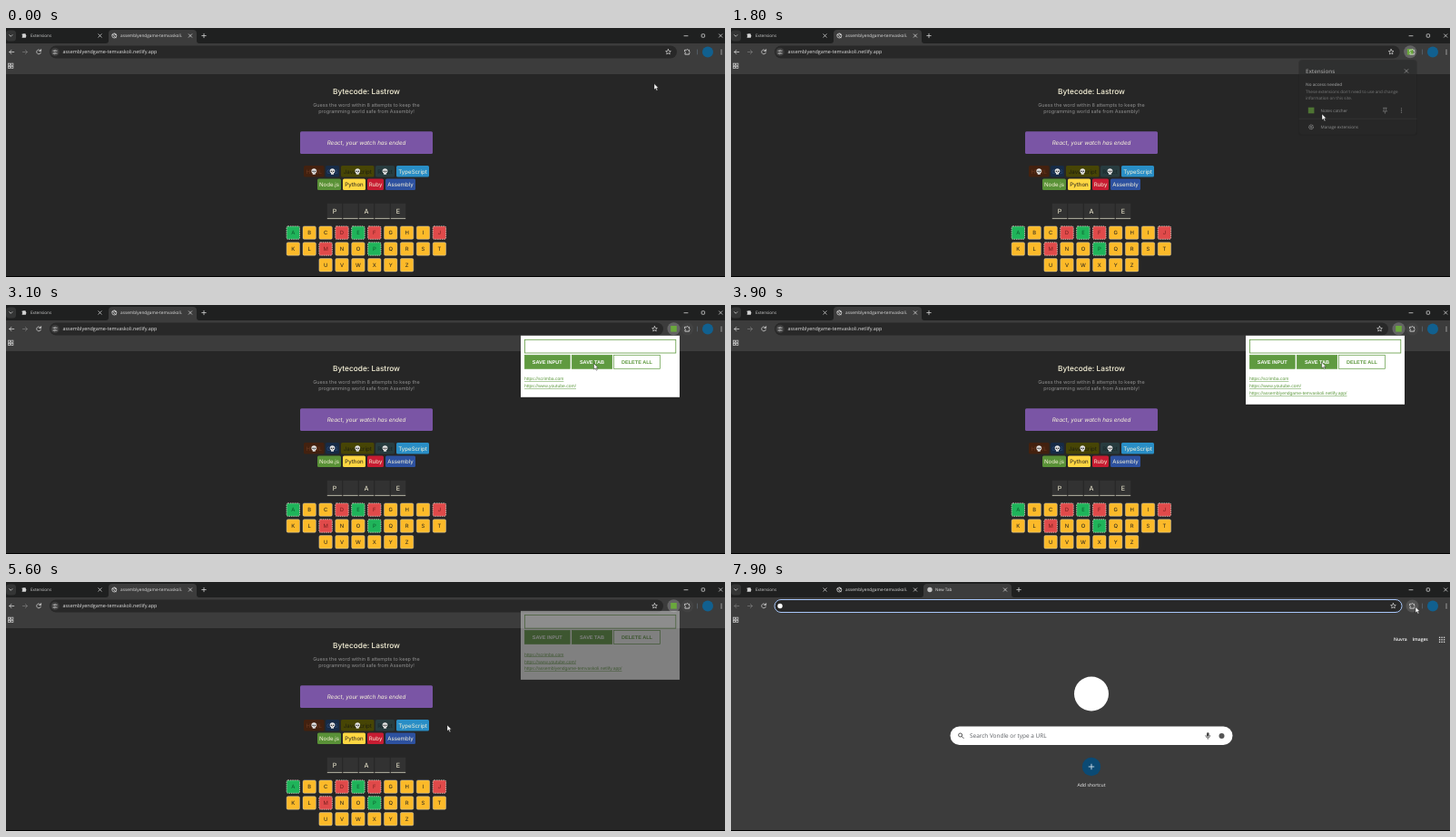
Animation of 792 by 275 pixels, one loop 8 s. Source, as an HTML page:

```html
<!DOCTYPE html>
<html lang="en">
<head>
<meta charset="utf-8">
<title>Browser extension demo</title>
<style>
  html, body { margin: 0; width: 100%; height: 100%; overflow: hidden; background: #262626; }
  svg { display: block; width: 792px; height: 275px; }
  text { text-rendering: geometricPrecision; white-space: pre; }
  .ui { font-family: "Open Sans", "Noto Sans", sans-serif; }
  .game { font-family: Inter, sans-serif; }
  .arial { font-family: "Liberation Sans", Arial, sans-serif; }
</style>
</head>
<body>
<svg id="stage" viewBox="0 0 792 275" xmlns="http://www.w3.org/2000/svg"></svg>
<script>
const LOOP = 8000, STEP = 100;
const CREAM = '#f9f4da', GREEN = '#5f9a40', BAR = '#3c3c3c', ICON = '#d4d4d4';
const SITE = 'assemblyendgame-temvaskoli.netlify.app';

const rect = (x, y, w, h, fill, r = 0, extra = '') =>
  `<rect x="${x}" y="${y}" width="${w}" height="${h}" rx="${r}" fill="${fill}" ${extra}/>`;
const circle = (x, y, r, fill, extra = '') =>
  `<circle cx="${x}" cy="${y}" r="${r}" fill="${fill}" ${extra}/>`;
const line = (d, color = ICON, width = 0.8) =>
  `<path d="${d}" fill="none" stroke="${color}" stroke-width="${width}" stroke-linecap="round" stroke-linejoin="round"/>`;
const text = (str, x, y, size, fill, cls = 'ui', extra = '') =>
  `<text x="${x}" y="${y}" font-size="${size}" fill="${fill}" class="${cls}" ${extra}>${str}</text>`;
const group = (id, body, extra = '') => `<g id="${id}" ${extra}>${body}</g>`;
const at = (x, y, body, scale = 1) => `<g transform="translate(${x} ${y}) scale(${scale})">${body}</g>`;
const MIDDLE = 'text-anchor="middle"';

// Icons, drawn around their own centre
const cross = (x, y, r = 1.7) => line(`M${x - r} ${y - r}l${2 * r} ${2 * r}M${x + r} ${y - r}l${-2 * r} ${2 * r}`);
const plus = (x, y, r = 2.2, color = ICON) => line(`M${x - r} ${y}h${2 * r}M${x} ${y - r}v${2 * r}`, color);
const kebab = (x, y, color = ICON) => [-2.2, 0, 2.2].map(d => circle(x, y + d, 0.65, color)).join('');
const PUZZLE = 'M-2.6 -1.7H-1A1.1 1.1 0 0 1 1 -1.7H2.1V0A1.1 1.1 0 0 1 2.1 1.9V3.1H-2.6V1.9A1.1 1.1 0 0 0 -2.6 0Z';
const puzzle = (x, y) => at(x, y, line(PUZZLE, ICON, 0.9));
const globe = (x, y) => circle(x, y, 2.5, 'none', `stroke="${ICON}" stroke-width=".8"`) +
  line(`M${x - 2.2} ${y - 1}q2.3 .2 2 1.2t2 1.9M${x + 0.3} ${y - 2.2}q-.2 1.6 1.8 1.5`, ICON, 0.9);
const arrow = (x, dir, color) => line(`M${x + 2.5 * dir} 26.5h${-5 * dir}m${2.1 * dir} -2.1l${-2.1 * dir} 2.1l${2.1 * dir} 2.1`, color);
const star = (x, y) => {
  let d = '';
  for (let i = 0; i < 10; i++) {
    const r = i % 2 ? 1.4 : 3, a = i * Math.PI / 5 - Math.PI / 2;
    d += `${i ? 'L' : 'M'}${(x + r * Math.cos(a)).toFixed(2)} ${(y + r * Math.sin(a)).toFixed(2)}`;
  }
  return line(d + 'Z', ICON, 0.7);
};
const skull = (x, y) => at(x, y,
  circle(0, -0.5, 2.8, '#e8e8e8') + rect(-1.5, 1, 3, 2.3, '#e8e8e8', 0.6) +
  circle(-1.1, -0.3, 0.8, '#222') + circle(1.1, -0.3, 0.8, '#222') + rect(-0.3, 0.9, 0.6, 0.8, '#222'));
const activeTab = (x, w) =>
  `<path d="M${x - 3} 17q3 0 3 -3V6q0 -4 4 -4h${w - 8}q4 0 4 4v8q0 3 3 3z" fill="${BAR}"/>`;

function browserFrame() {
  const tabs = rect(0, 0, 792, 17, '#1f2020') +
    rect(0, 2.5, 11, 12, '#343535', 3.5) + line('M3.7 7.7l1.6 1.6l1.6 -1.6') +
    group('siteTab', activeTab(113, 97)) +
    group('blankTab', activeTab(212, 97) + circle(219, 8.5, 2.7, '#c4c4c4') +
      text('New Tab', 225, 10.2, 4.65, '#e3e3e3') + cross(302, 8.5)) +
    at(20, 8, `<path d="${PUZZLE}" fill="${ICON}"/>`, 0.9) +
    text('Extensions', 27, 10.2, 4.6, '#d0d0d0') + cross(103.5, 8.5) +
    globe(119.3, 8.5) + group('siteName', text(SITE, 126, 10.2, 4.75, '#dedede'), 'clip-path="url(#tabClip)"') + cross(203, 8.5) +
    group('addTab', circle(0, 8.3, 6, '#0d4a78', 'id="addHover"') + plus(0, 8.5)) +
    line('M747 8.7h4') + rect(766.2, 6.8, 3.4, 3.4, 'none', 0.6, `stroke="${ICON}" stroke-width=".8"`) + cross(787.2, 8.5);
  const bar = rect(0, 17, 792, 34, BAR) +
    group('backOn', arrow(6.3, 1, ICON)) + group('backOff', arrow(6.3, 1, '#777')) + arrow(21, -1, '#777') +
    line('M38.3 25.3a2.4 2.4 0 1 0 .1 2M38.6 23.6v1.9h-1.9') +
    rect(48, 19.5, 691, 14, '#282828', 7, 'id="omnibox"') +
    group('address', circle(54, 26.5, 4.7, '#3c3c3c') + line('M51.9 25.2h1.4M55.6 25.2h.6M51.9 28h.6M54.8 28h1.4') +
      circle(54.2, 25.2, 0.8, 'none', `stroke="${ICON}" stroke-width=".6"`) +
      circle(53.6, 28, 0.8, 'none', `stroke="${ICON}" stroke-width=".6"`) +
      text(SITE, 62.5, 28.4, 5.42, '#e3e3e3')) +
    group('blankAddress', circle(54, 26.5, 2.7, '#fff')) +
    group('star', star(729.5, 26.5)) +
    group('pinned', circle(750.5, 26.3, 7, '#646464') + rect(747.2, 23, 6.6, 6.6, '#6aa83c')) +
    circle(750.5, 26.5, 7, '#555', 'id="puzzleHover"') + puzzle(750.5, 26) +
    line('M761.5 24v5', '#5c6a78', 0.7) + circle(773, 26.5, 6, '#11608f') + kebab(788, 26.5) +
    [[3.6, 40.2], [6.8, 40.2], [3.6, 43.4], [6.8, 43.4]]
      .map(([x, y]) => rect(x - 1.1, y - 1.1, 2.2, 2.2, 'none', 0, `stroke="${ICON}" stroke-width=".7"`)).join('');
  return tabs + bar;
}

function gamePage() {
  const tag = (name, x, y, w, fill, color, lost) => rect(x, y, w, 12.5, fill, 1.5) +
    text(name, x + w / 2, y + 8.5, 6.15, color, 'game', MIDDLE) + (lost ? skull(x + w / 2, y + 6.5) : '');
  const tags = [
    ['HTML', 328, 152, 22.5, '#43210f', '#6b3a22', true], ['CSS', 352, 152, 15, '#172b46', '#31507c', true],
    ['JavaScript', 369, 152, 36.5, '#474505', '#1d1d10', true], ['React', 407, 152, 21, '#283c3f', '#172426', true],
    ['TypeScript', 430, 152, 36, '#298ec6', CREAM], ['Node.js', 343, 166.5, 26, '#599137', CREAM],
    ['Python', 371, 166.5, 25, '#ffd742', '#1e1e1e'], ['Ruby', 398, 166.5, 18, '#c71c32', CREAM],
    ['Assembly', 418, 166.5, 33, '#2d519f', CREAM]
  ].map(a => tag(...a)).join('');

  const cells = [...'P A E'].length && ['P', '', 'A', '', 'E'].map((c, i) => {
    const x = 362 + 17.5 * i;
    return rect(x - 8.2, 193.8, 16.4, 16.6, '#323232') + rect(x - 8.2, 209.9, 16.4, 0.8, '#d8d4c0') +
      text(c, x, 204.6, 7.2, CREAM, 'game', MIDDLE);
  }).join('');

  const key = (c, x, y) => {
    const hit = 'AEP'.includes(c), miss = 'DFJM'.includes(c), used = hit || miss;
    const fill = hit ? '#1fb45a' : miss ? '#e04a4a' : '#fcba29';
    const edge = used ? 'stroke="#e8d8d0" stroke-width=".8" stroke-dasharray="1.4 1"' : 'stroke="#d7d7d7" stroke-width=".4"';
    return rect(x - 7.2, y - 7.2, 14.4, 14.4, fill, 1.5, edge) +
      text(c, x, y + 2.1, 5.9, hit ? '#0d5a2d' : miss ? '#74201f' : '#1e1e1e', 'game', MIDDLE);
  };
  const keys = [['ABCDEFGHIJ', 316.3], ['KLMNOPQRST', 316.3], ['UVWXYZ', 352.1]]
    .map(([row, x], r) => [...row].map((c, i) => key(c, x + 17.9 * i, 226.1 + 17.85 * r)).join('')).join('');

  return rect(0, 51, 792, 224, '#262626') +
    text('Bytecode: Lastrow', 397, 72.7, 8.3, CREAM, 'game', MIDDLE + ' font-weight="500"') +
    text('Guess the word within 8 attempts to keep the', 397, 87, 5.5, '#8e8e8e', 'game', MIDDLE) +
    text('programming world safe from Assembly!', 397, 94.4, 5.5, '#8e8e8e', 'game', MIDDLE) +
    rect(324, 114.3, 146, 24.8, '#7a55a5', 1.5) +
    text('React, your watch has ended', 397, 129.1, 6.28, CREAM, 'game', MIDDLE + ' font-style="italic"') +
    tags + cells + keys;
}

function newTabPage() {
  const dots = [0, 1, 2].map(r => [0, 1, 2].map(c => circle(780.6 + 2.5 * c, 61.2 + 2.5 * r, 0.8, '#e8e8e8')).join('')).join('');
  return rect(0, 50, 792, 225, BAR) + group('newTabBody',
    text('Nuvra', 730, 65.4, 5, '#fff', 'ui', 'font-weight="600"') +
    text('Images', 750.5, 65.4, 5, '#fff', 'ui', 'font-weight="600"') + dots +
    circle(397, 123.5, 19, '#fff') +
    rect(241.5, 159.5, 311, 20.5, '#fff', 10.2) +
    circle(252.6, 169, 2, 'none', 'stroke="#444" stroke-width=".9"') + line('M254.2 170.6l2 2', '#444', 0.9) +
    text('Search Vondle or type a URL', 263, 172.2, 6.45, '#5a5d61') +
    rect(524, 166.2, 2.6, 4.6, '#444', 1.3) + line('M522.8 169.5a2.5 2.5 0 0 0 5 0M525.3 172v1.5', '#444', 0.7) +
    circle(540.5, 170, 3, '#555') +
    circle(397, 204, 10.2, '#0b4a74') + plus(397, 204, 2.8, '#e8f2fa') +
    text('Add shortcut', 397, 225.9, 5.2, '#f0f0f0', 'ui', MIDDLE));
}

function extensionsMenu() {
  const soft = '#b0b0b0';
  return rect(625, 35, 131, 84, '#1c1c1c', 4, 'opacity=".4"') + rect(626, 35.5, 129, 82, '#282929', 4) +
    text('Extensions', 633, 50.3, 6.2, '#d2d2d2', 'ui', 'font-weight="600"') + cross(744, 47.5, 1.8) +
    text('No access needed', 633, 63.5, 4.65, '#d2d2d2', 'ui', 'font-weight="600"') +
    text("These extensions don't need to use and change", 633, 71.6, 4.6, soft) +
    text('information on this site.', 633, 79.2, 4.6, soft) +
    rect(635.8, 87.7, 6.6, 6.6, '#6aa83c') + text('Notes catcher', 649.5, 92.9, 4.6, '#d2d2d2') +
    line('M718.6 88.3h3.6M719.2 88.3v2.6l-1 1.2h4.4l-1 -1.2v-2.6M720.4 92.1v2.2', soft, 0.7) + kebab(738.5, 91, soft) +
    line('M626 100.3h129', '#454545', 0.6) +
    circle(639, 109.3, 2.3, 'none', `stroke="${soft}" stroke-width="1.2" stroke-dasharray="1.3 .5"`) + circle(639, 109.3, 1, soft) +
    text('Manage extensions', 649.5, 111, 4.6, '#d2d2d2');
}

function savedLinksPopup() {
  const button = (label, x, w, fill, color) => rect(x + 0.3, 55.3, w - 0.6, 15, fill, 0, `stroke="${GREEN}" stroke-width=".7"`) +
    text(label, x + w / 2, 64.8, 5.55, color, 'arial', MIDDLE + ' font-weight="700"');
  const link = (url, y, extra = '') => text(url, 571, y, 5, GREEN, 'arial', 'text-decoration="underline" ' + extra);
  return rect(567, 33.8, 175, 68, '#fff', 0, 'id="sheet"') +
    rect(571.4, 38.3, 166.4, 14.7, '#fff', 0, `stroke="${GREEN}" stroke-width=".8"`) +
    button('SAVE INPUT', 571, 50.5, GREEN, '#fff') + button('SAVE TAB', 623, 45, GREEN, '#fff') +
    button('DELETE ALL', 669.3, 51.4, '#fff', GREEN) +
    link('https://scrimba.com', 83.4) + link('https://www.youtube.com/', 91.4) +
    link(`https://${SITE}/`, 99.3, 'id="newLink"');
}

const stage = document.getElementById('stage');
stage.innerHTML = '<clipPath id="tabClip"><rect x="126" y="2" width="68" height="13"/></clipPath>' +
  group('game', gamePage()) + group('newTab', newTabPage()) + browserFrame() +
  group('menu', extensionsMenu()) + group('popup', savedLinksPopup()) + rect(0, 274, 792, 1, '#000') +
  group('cursor', '<path d="M0 0V6.6L1.6 5.2L2.7 7.7L3.8 7.2L2.7 4.8H4.7Z" fill="#fff" stroke="#111" stroke-width=".4"/>');
const el = {};
stage.querySelectorAll('[id]').forEach(node => el[node.id] = node);

const ease = p => { p = Math.min(1, Math.max(0, p)); return p * p * (3 - 2 * p); };
const ramp = (t, from, to) => ease((t - from) / (to - from));
const show = (name, opacity) => el[name].setAttribute('opacity', +opacity);
const move = (name, x, y = 0) => el[name].setAttribute('transform', `translate(${x} ${y})`);

// Pointer stops: time, x, y
const PATH = [[0, 714, 61.5], [200, 714, 61.5], [800, 749, 25], [1000, 749, 25], [1500, 651, 95], [1900, 651, 95],
  [2700, 647.5, 64.5], [3800, 647.5, 64.5], [4700, 740, 26.5], [4900, 740, 26.5], [5400, 486, 158], [5700, 486, 158],
  [6500, 213, 5.8], [7200, 213, 5.8], [7900, 754, 27.5], [LOOP, 754, 27.5]];

function pointer(t) {
  const i = PATH.findIndex((stop, n) => n > 0 && t < stop[0]);
  const [t0, x0, y0] = PATH[i - 1], [t1, x1, y1] = PATH[i];
  const p = ramp(t, t0, t1);
  return [x0 + (x1 - x0) * p, y0 + (y1 - y0) * p];
}

function render(t) {
  const blank = t >= 7200, saved = t >= 3300;
  const [x, y] = pointer(t);
  const shift = 15 * (ramp(t, 1700, 2100) - ramp(t, 5700, 6100));
  const closing = ramp(t, 5500, 5690);

  for (const name of ['game', 'siteTab', 'address', 'backOn']) show(name, !blank);
  for (const name of ['newTab', 'blankTab', 'blankAddress', 'backOff']) show(name, blank);
  show('newTabBody', t >= 7300);
  move('addTab', blank ? 317 : 218);
  show('addHover', !blank && Math.hypot(x - 215, y - 7) < 9);

  el.omnibox.setAttribute('width', 691 - shift);
  el.omnibox.setAttribute('stroke', blank ? '#a8c7fa' : 'none');
  move('star', -shift);
  move('pinned', -shift);
  show('pinned', Math.min(1, shift / 2));
  show('puzzleHover', Math.hypot(x - 750.5, y - 26.5) < 7 ? 0.9 : shift > 10 ? 0.25 : 0);

  show('menu', ramp(t, 900, 1150) * (1 - 0.4 * ramp(t, 1700, 1800)) * (t < 1900));
  show('popup', t >= 2000 ? 1 - 1.08 * closing : 0);
  move('popup', 0, -3.5 * closing);
  el.sheet.setAttribute('height', saved ? 76 : 68);
  show('newLink', saved);
  move('cursor', x, y);
}

function tick() {
  const t = performance.now() % LOOP;
  render(Math.floor(t / STEP) * STEP);
  requestAnimationFrame(tick);
}
tick();
</script>
</body>
</html>
```
